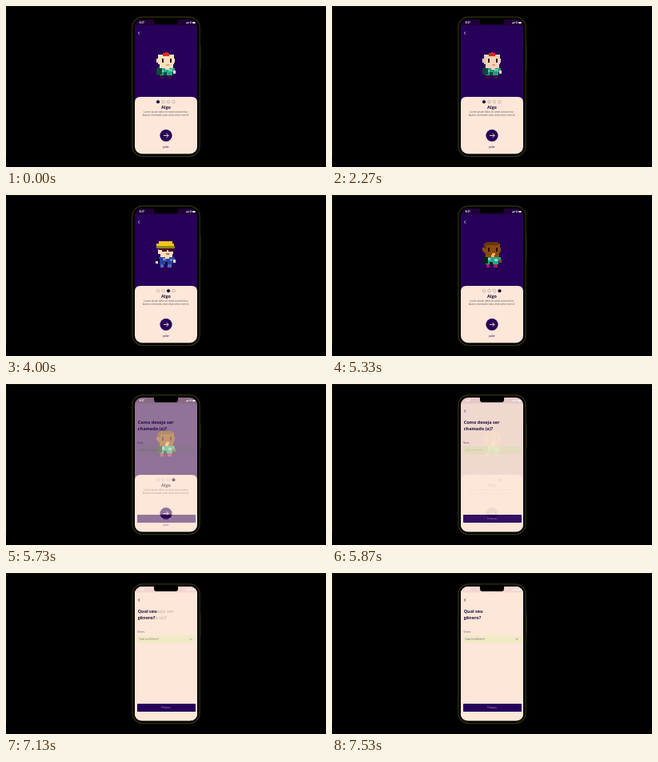
Write an HTML page that moves like this. It is 400 by 202 pixels and loops after 8 s.

```html
<!DOCTYPE html>
<html lang="pt">
<head>
<meta charset="utf-8">
<title>Onboarding</title>
<style>
html, body { margin: 0; width: 100%; height: 100%; overflow: hidden; background: #000; }
svg { display: block; width: 100%; height: 100%; font-family: "Open Sans", "Noto Sans", sans-serif; }
.title { font-size: 5.5px; font-weight: 700; fill: #20103a; }
.small { font-size: 2.7px; }
.body { font-size: 2.95px; }
.bold { font-size: 2.9px; font-weight: 700; }
.mid { text-anchor: middle; }
</style>
</head>
<body>
<svg id="stage" viewBox="0 0 400 202"></svg>
<script>
const LOOP = 8000, FADE = 350;
const PURPLE = '#27005a', CREAM = '#fee7d8', SKIN = '#ffdfbd', OUTLINE = '#34340c';
const SLIDES = [2265, 3710, 4710], NAME_AT = 5660, GENDER_AT = 6985;

const rect = (x, y, w, h, fill, extra = '') =>
  `<rect x="${x}" y="${y}" width="${w}" height="${h}" fill="${fill}" ${extra}/>`;
const path = (d, color, width = 0.7) =>
  `<path d="${d}" fill="none" stroke="${color}" stroke-width="${width}"/>`;
const text = (x, y, str, cls, fill = '') =>
  `<text x="${x}" y="${y}" class="${cls}" ${fill && `style="fill:${fill}"`}>${str}</text>`;
const chevron = color => path('M167 32.3l-1.7 1.7 1.7 1.7', color, 0.8);

// One filled path per colour, drawn back to front.
const sprite = layers => `<g class="hero" shape-rendering="crispEdges">${
  layers.map(([fill, d]) => `<path fill="${fill}" d="${d}"/>`).join('')}</g>`;
const box = (x, y, w, h) => `M${x} ${y}h${w}v${h}h${-w}z`;
const head = box(190, 61, 20, 12) + box(188, 66, 23, 5) + box(192, 72, 17, 6);
const eyes = box(195, 66, 2, 5) + box(205, 66, 2, 5);
const torso = box(192, 77, 16, 10) + box(207, 78, 4, 5);
const back = box(188, 78, 7, 8) + box(190, 76, 4, 2);
const feet = box(193, 87, 4, 4) + box(202, 87, 5, 4);
const hand = box(209, 81, 3, 4);
const chest = box(199, 77, 5, 3);
const mouth = box(200, 73, 4, 2);

const heroes = [
  [['#451239', feet], ['#22a68c', torso], ['#0b4b3b', back + box(197, 83, 4, 4)],
   ['#69d1ad', box(203, 79, 5, 3) + box(195, 80, 2, 3)],
   [SKIN, head + hand + chest], ['#e6efc8', box(190, 61, 6, 3)],
   ['#e5a57f', mouth], ['#e32b20', box(196, 59, 8, 4) + box(199, 58, 3, 2)],
   ['#30151d', eyes]],
  [['#451239', feet], ['#b53a3a', torso], ['#6b2430', back], [SKIN, head + hand + chest],
   ['#5a2d1c', box(190, 60, 20, 5) + box(189, 62, 4, 11)],
   ['#e5a57f', mouth], ['#30151d', eyes]],
  [['#5668b8', feet], ['#2b42a3', torso + box(191, 78, 4, 4)],
   ['#0c0820', box(187, 80, 5, 5) + box(199, 84, 3, 3)],
   ['#6f8ed2', box(196, 79, 4, 3) + box(205, 80, 3, 3)],
   [SKIN, box(190, 68, 19, 6) + box(193, 73, 15, 5) + hand + chest],
   ['#f4c51f', box(188, 61, 22, 4) + box(191, 58, 17, 4)],
   ['#8a8a18', box(188, 64, 23, 3)],
   ['#4a0f22', box(191, 67, 19, 2) + box(195, 69, 6, 2) + box(203, 69, 6, 2)],
   ['#f1f1f7', box(187, 83, 3, 3)], ['#c9685a', mouth]],
  [['#a01e4e', feet], ['#28a58c', torso], ['#0a211f', back + box(197, 84, 4, 3)],
   ['#8bd9b8', box(195, 79, 3, 3) + box(203, 80, 4, 3)],
   ['#8a4a0e', head + hand], ['#67340a', box(192, 59, 16, 4) + box(190, 62, 3, 5)],
   ['#20100c', eyes], ['#f5b45a', mouth + box(199, 75, 4, 3)],
   ['#d83a22', box(200, 72, 4, 1)]]
];

const status = (bar, ink) => rect(161, 17, 78, 7.5, bar) +
  text(166.8, 22.1, '8:37', 'bold', ink) +
  path('M225.5 22v-1M226.7 22v-1.6M227.9 22v-2.2', ink, 0.8) +
  path('M229.5 20.5q1.4-1.2 2.8 0M230.2 21.6q.7-.6 1.4 0', ink, 0.7) +
  rect(233.2, 20, 3.3, 2, ink, 'rx=".4"');

const intro = rect(161, 17, 78, 168, PURPLE) + status('#21003a', '#fff') +
  chevron(CREAM) + heroes.map(sprite).join('') +
  `<path d="M161 186V121q0-7 7-7h64q7 0 7 7v65z" fill="${CREAM}"/>` +
  [190, 196.5, 203, 209.5].map(x =>
    `<circle cx="${x}" cy="120.2" r="1.8" fill="none" stroke="#aa9a92" stroke-width=".6"/>
     <circle class="dot" cx="${x}" cy="120.2" r="2" fill="#180034"/>`).join('') +
  text(200, 129, 'Algo', 'title mid') +
  text(200, 134.4, 'Lorem ipsum dolor sit amet consectetur.', 'body mid', '#55505a') +
  text(200, 138.4, 'Auctor commodo vitae vitae tortor sem id.', 'body mid', '#55505a') +
  `<circle cx="200" cy="162.5" r="7.6" fill="${PURPLE}"/>` +
  path('M197 162.5h6M200.6 160l2.5 2.5-2.5 2.5', '#ffe8b8', 0.9) +
  text(200, 177.9, 'pular', 'bold mid', '#6a4580');

const form = (id, lines, label, hint, hintInk, arrow, extra = '') =>
  `<g id="${id}">` + rect(161, 17, 78, 168, CREAM) + status('#f4d6d0', '#fff') + chevron(arrow) +
  lines.map((line, i) => text(164.7, 50.2 + i * 7.8, line, 'title')).join('') +
  text(164.2, 74.6, label, 'small', '#69556f') +
  rect(164, 78, 73, 10, '#f1eac6', 'rx=".8"') +
  text(166.5, 84, hint, 'body', hintInk) + extra +
  rect(164, 164, 73, 10, PURPLE, 'rx=".8"') +
  text(200, 170, 'Próximo', 'body mid', '#b9a0c4') + '</g>';

const stage = document.getElementById('stage');
stage.innerHTML =
  `<clipPath id="screen"><rect x="161" y="17" width="78" height="168.5" rx="9"/></clipPath>` +
  rect(0, 0, 400, 202, '#000') + path('M.5 188V.5H400', '#141400', 1) +
  path('M242.9 50v30', OUTLINE, 1) +
  rect(157.8, 13.8, 84.4, 174.8, '#000', `rx="13" stroke="${OUTLINE}" stroke-width="1.2"`) +
  '<g clip-path="url(#screen)">' + intro +
  form('name', ['Como deseja ser', 'chamado (a)?'], 'Nome', 'Digite seu nome', '#cfc78f', '#4a1d82') +
  form('gender', ['Qual seu', 'gênero?'], 'Gênero', 'Qual seu Gênero?', '#65516f', '#20103a',
    path('M229.5 82.2l1.5 1.4 1.5-1.4', '#65516f', 0.6)) + '</g>' +
  '<path d="M184 16.5h32q-1 .3-1 2v1.2q0 3.3-3.3 3.3h-23.4q-3.3 0-3.3-3.3v-1.2q0-1.7-1-2z" fill="#000"/>';

const sprites = stage.querySelectorAll('.hero');
const dots = stage.querySelectorAll('.dot');
const nameForm = document.getElementById('name');
const genderForm = document.getElementById('gender');

function fade(t, start) {
  const p = Math.min(1, Math.max(0, (t - start) / FADE));
  return 1 - (1 - p) ** 3;
}

function draw(t) {
  const slide = SLIDES.reduce((sum, start) => sum + fade(t, start), 0);
  sprites.forEach((el, i) => {
    const shown = Math.max(0, 1 - Math.abs(slide - i));
    el.setAttribute('opacity', shown);
    dots[i].setAttribute('opacity', shown);
  });
  nameForm.setAttribute('opacity', fade(t, NAME_AT));
  genderForm.setAttribute('opacity', fade(t, GENDER_AT));
}

const begin = performance.now();
function tick() {
  draw((performance.now() - begin) % LOOP);
  requestAnimationFrame(tick);
}
draw(0);
requestAnimationFrame(tick);
</script>
</body>
</html>
```
